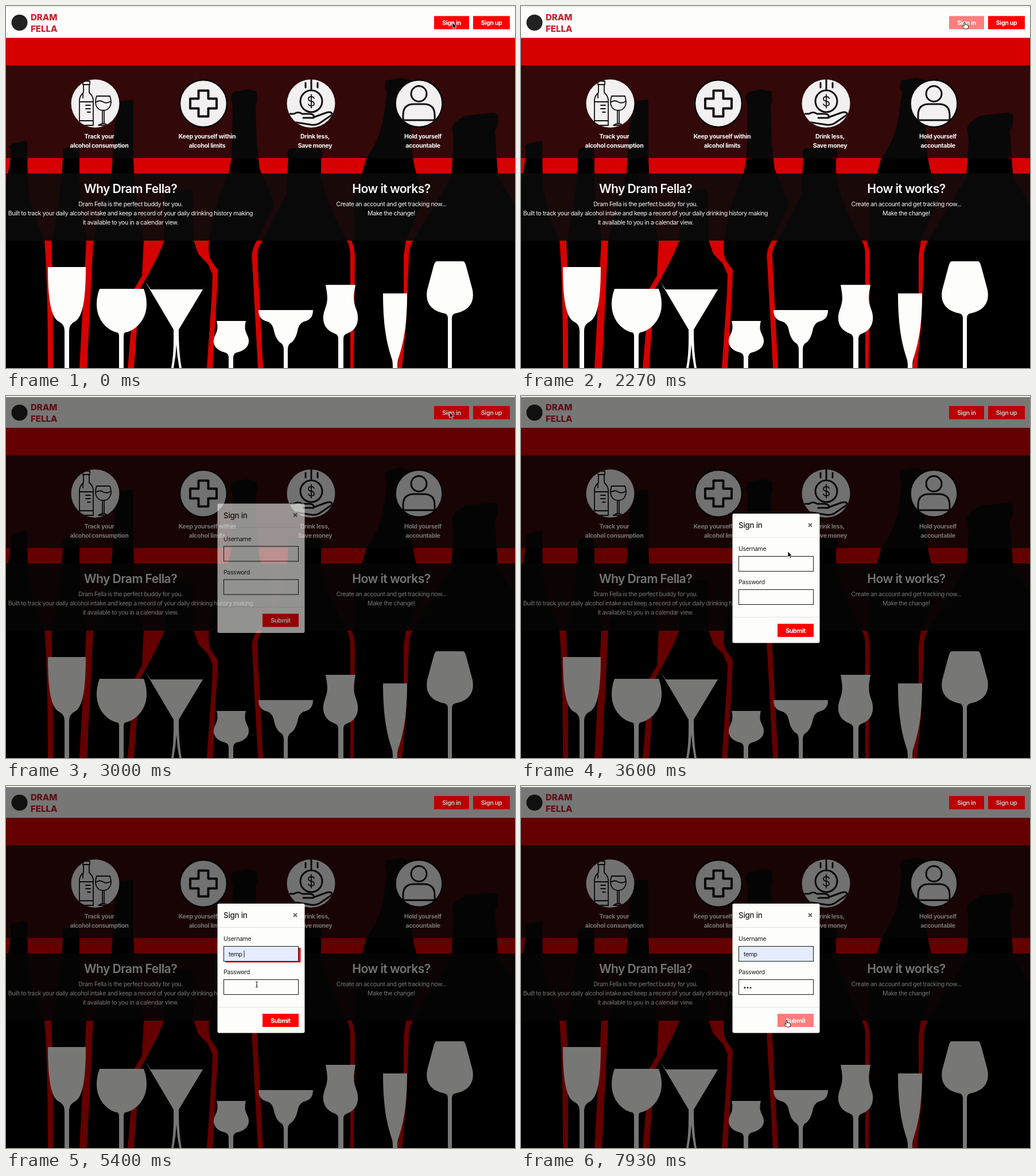
Recreate the animation shown at these times as an HTML page. Size 887 px wide and 631 px high, loop 8000 ms.

```html
<!DOCTYPE html>
<html lang="en">
<head>
<meta charset="utf-8">
<title>Drink tracker sign in</title>
<style>
html, body { margin: 0; width: 100%; height: 100%; overflow: hidden; background: #000; }
svg { display: block; width: 887px; height: 631px; font: 10.6px Inter, "Open Sans", sans-serif; letter-spacing: -.41px; }
.mid { text-anchor: middle; }
.bold { font-weight: 700; letter-spacing: -.34px; }
.head { font-size: 21.2px; font-weight: 600; letter-spacing: -.6px; }
.line { fill: none; stroke: #111; stroke-width: 3; stroke-linecap: round; stroke-linejoin: round; }
.thin { stroke-width: 1.8; }
.thick { stroke-width: 4; }
.field { stroke: #151515; }
</style>
</head>
<body>
<svg viewBox="0 0 887 631">
  <defs>
    <clipPath id="disc"><circle cx="155.5" cy="170" r="42"/></clipPath>
    <clipPath id="coinDisc"><circle cx="531.5" cy="170" r="42"/></clipPath>
  </defs>

  <rect width="887" height="631" fill="#d60000"/>
  <g id="bottles">
    <path d="M8 265V249L6 246 11 240 34 235 38 238 37 250 38 310Q42 350 67 409H0V310Q4 290 8 265Z"/>
    <path d="M99 265 100 250 105 247 127 246 128 262 128 300Q130 350 141 409H80Q92 350 97 300Z"/>
    <path d="M190 200 197 183 198 166 220 163 222 167 222 265 224 310Q226 350 240 409H152Q170 340 184 292Z"/>
    <path d="M277 327 282 320H321L326 327 327 409H276Z"/>
    <path d="M395 173 391 160 396 150 420 145 437 149 438 166 435 173 437 240 442 284 468 345 437 409H354Q364 340 388 292L393 265Z"/>
    <path d="M492 265 490 255 494 248H549L552 258 549 268V295Q556 340 594 409H447L488 330Z"/>
    <path d="M664 150 660 142 662 130 688 125 706 130 708 140 704 148 705 220Q706 260 715 292L728 335 697 409H607V340L628 265Q650 235 657 200Z"/>
    <path d="M780 235 777 213 782 203 800 191 850 186 858 190 857 210 852 217 855 265 858 300 887 345V409H709L776 300Z"/>
  </g>
  <rect y="409" width="887" height="222"/>
  <g fill="#d60000">
    <path d="M67 409H79Q82 470 82 631H73Q73 480 67 409Z"/>
    <path d="M140 409H152L141 631H128Z"/>
    <path d="M240 409H276L265 435 244 475 233 494 223 631H212L224 492 237 470Z"/>
    <path d="M327 409H354Q351 432 358 445L369 460 368 490 360 631H350L359 500 360 468 352 450 335 432Z"/>
    <path d="M437 409H447Q436 424 438 440L448 631H439L429 445Q426 428 437 409Z"/>
    <path d="M594 409H602Q608 422 608 440L606 631H600V435Q600 420 594 409Z"/>
    <path d="M697 409H709Q701 423 702 440L697 560 690 631H682L693 540 693 435Z"/>
  </g>

  <g id="glasses" fill="#fdfdfb">
    <path d="M73 455H139C139 505 135 542 120 550Q110 555 110 566V631H102V566Q102 555 92 550C77 542 73 505 73 455Z"/>
    <path d="M163 493H240Q245 505 245 520C245 550 222 567 208 569Q205 570 205 576V631H197V576Q197 570 194 569C180 567 158 550 158 520Q158 505 163 493Z"/>
    <path d="M243 481 252 494H343L351 481 301 564Q301 605 306 631H302Q298 610 297 590 296 610 292 631H288Q293 605 292 564Z"/>
    <path d="M367 549H418Q414 562 420 573C429 590 417 601 402 604Q396 606 396 613V631H388V613Q388 606 382 604C368 601 356 590 365 573Q371 562 367 549Z"/>
    <path d="M440 530H535Q535 545 523 549 512 551 509 562 505 583 495 588 491 591 491 600V631H484V600Q484 591 480 588 470 583 466 562 463 551 452 549 440 545 440 530Z"/>
    <path d="M557 486H609C606 504 604 512 610 528 617 546 613 564 594 571Q588 573 588 580V631H579V580Q579 573 573 571C553 564 549 546 556 528 562 512 560 504 557 486Z"/>
    <path d="M657 501H699C699 560 692 590 683 617Q682 622 682 631H674Q674 622 673 617C664 590 657 560 657 501Z"/>
    <path d="M750 445H797Q800 446 802 454L813 495C818 523 799 533 782 536Q777 538 777 544V631H770V544Q770 538 765 536C748 533 729 523 734 495L745 454Q747 446 750 445Z"/>
  </g>

  <rect y="103.500" width="887" height="161.500" fill="#0a0a0a" opacity=".8"/>
  <rect y="292" width="887" height="117" fill="#0a0a0a" opacity=".92"/>

  <g fill="#f2f0f0">
    <circle cx="155.5" cy="170" r="42"/>
    <circle cx="344" cy="170" r="41" stroke="#080606" stroke-width="2.500"/>
    <circle cx="531.5" cy="170" r="42"/>
    <circle cx="719.5" cy="170" r="41" stroke="#080606" stroke-width="2.500"/>
  </g>
  <g class="line thin" clip-path="url(#disc)">
    <path d="M134 131H146V137H134ZM135 137V151Q129 156 128 163V208H152V163Q151 156 145 151V137M128 167H152M128 200H152M139 173H147M139 179H147M142 185H147M134 152V160"/>
    <path d="M158 157H181C186 171 181 182 169.500 182 158 182 153 171 158 157ZM156 168Q163 163 169 167T183 166M168 182V205M171 182V205M161 208Q169.500 202 178 208Z"/>
  </g>
  <path class="line thick" d="M335.500 147.500H352.500V161.500H367V178.500H352.500V192.500H335.500V178.500H321V161.500H335.500Z"/>
  <g class="line" clip-path="url(#coinDisc)">
    <circle cx="532" cy="166" r="19"/>
    <path d="M522 134V142M532 128V145M543 134V142M495 188H502Q509 183 516 188H530Q538 189 536 195H518M536 194 558 186Q567 183 569 189L547 204Q541 208 532 207L507 203H495"/>
    <path class="thin" d="M537 161Q536 158 532 158 527 158 527 162 527 165 532 166 537 167 537 170.500 537 174 532 174 528 174 527 171M532 154.500V177.500"/>
  </g>
  <g class="line">
    <circle cx="719.500" cy="153" r="13.500"/>
    <path d="M692 199V190Q692 171 711 171H728Q747 171 747 190V199Z"/>
  </g>

  <g id="copy" class="mid" fill="#f8f8f8"></g>

  <rect y="2" width="887" height="53.500" fill="#fdfdfc"/>
  <circle cx="23.5" cy="29" r="14" fill="#222"/>
  <g fill="#c8202c" font-size="15" font-weight="800" letter-spacing="0">
    <text x="43" y="24.500">DRAM</text><text x="43" y="45">FELLA</text>
  </g>

  <rect id="dim" y="2" width="887" height="629" opacity="0"/>
  <rect width="887" height="2" fill="#fafaf2"/>
  <rect y="1" width="887" height="1" fill="#e6e6d2"/>

  <g class="mid bold">
    <g id="signIn">
      <rect x="746" y="17.500" width="61" height="23" fill="#f00"/><text x="776.500" y="33" fill="#fff">Sign in</text>
    </g>
    <rect x="814" y="17.500" width="64" height="23" fill="#f00"/><text x="846" y="33" fill="#fff">Sign up</text>
    <path id="buttonDim" d="M746 17.500H807V40.500H746ZM814 17.500H878V40.500H814Z" opacity="0"/>
  </g>

  <g id="modal" opacity="0" fill="#1c1c1c">
    <rect x="368.500" y="205" width="152" height="225.500" rx="3" fill="#fdfdfb"/>
    <path d="M369 246.500H520M369 385.500H520" stroke="#dee2e6"/>
    <text x="379" y="230" font-size="13.300" font-weight="500" letter-spacing="-.2">Sign in</text>
    <path d="M501 222 507 228M507 222 501 228" stroke="#666" stroke-width="2"/>
    <text x="379" y="270">Username</text>
    <text x="379" y="328">Password</text>
    <rect id="glow" x="382.500" y="282" width="131" height="25.500" fill="#f00"/>
    <rect id="userField" class="field" x="379.500" y="279.500" width="130" height="26"/>
    <rect class="field" x="379.500" y="337.500" width="130" height="26" fill="#fdfdfb"/>
    <text id="userText" x="388" y="296.500">temp</text>
    <g id="dots"><circle cx="390" cy="351.500" r="1.500"/><circle cx="395" cy="351.500" r="1.500"/><circle cx="400" cy="351.500" r="1.500"/></g>
    <rect id="caret" width="1" height="12"/>
    <g id="submit" class="mid bold">
      <rect x="447" y="397" width="63" height="23" fill="#f00"/><text x="478.500" y="412.500" fill="#fff">Submit</text>
    </g>
  </g>

  <g id="cursor">
    <path id="arrow" d="M0 0V10L2.400 7.900 4 11.500 5.800 10.700 4.200 7.300H7.300Z" fill="#000" stroke="#fff" stroke-width=".8"/>
    <path id="hand" d="M-1 1Q0-.5 1 1V5L2 4.500 3.500 5 5 5.200 6.500 6.500V9L5.500 12H-.5L-4 7.500Q-4 6-2.500 6.500L-1 8Z" fill="#fff" stroke="#111" stroke-width=".9"/>
    <path id="beam" d="M-2-5Q0-5 0-3.500 0-5 2-5M0-4V4M-2 5Q0 5 0 3.500 0 5 2 5M-1 1H1" fill="none" stroke="#222"/>
  </g>
</svg>
<script>
const $ = id => document.getElementById(id);
const LOOP = 8000, STEP = 1000 / 15;

const copy = [
  ["bold", 162.5, 231, "Track your", "alcohol consumption"],
  ["bold", 350.5, 231, "Keep yourself within", "alcohol limits"],
  ["bold", 538.5, 231, "Drink less,", "Save money"],
  ["bold", 726.5, 231, "Hold yourself", "accountable"],
  ["head", 217, 326, "Why Dram Fella?"],
  ["head", 671.5, 326, "How it works?"],
  ["", 217, 348.5, "Dram Fella is the perfect buddy for you.",
    "Built to track your daily alcohol intake and keep a record of your daily drinking history making",
    "it available to you in a calendar view."],
  ["", 671.5, 348.5, "Create an account and get tracking now...", "Make the change!"]
];
for (const [style, x, y, ...lines] of copy) lines.forEach((line, i) => {
  const text = document.createElementNS("http://www.w3.org/2000/svg", "text");
  text.setAttribute("class", style);
  text.setAttribute("x", x);
  text.setAttribute("y", y + i * 16.3);
  text.textContent = line;
  $("copy").append(text);
});

// Pointer positions: time, x, y
const path = [
  [0, 778, 29], [400, 773, 27], [2740, 773, 28], [3000, 773, 28], [3530, 465, 271],
  [3600, 465, 271], [3870, 440, 292], [4870, 440, 292], [5270, 437, 346],
  [7130, 437, 346], [7600, 463, 408], [8000, 463, 408]
];
// Pointer shapes: start time, shape
const shapes = [
  [0, "arrow"], [60, "hand"], [2730, "arrow"], [3730, "beam"], [4330, ""],
  [4860, "beam"], [5990, ""], [7130, "beam"], [7260, "arrow"], [7520, "hand"]
];
const keyTimes = [6330, 6660, 6930];

const clamp = v => Math.min(1, Math.max(0, v));
const show = (id, on) => { $(id).style.display = on ? "" : "none"; };
const fade = (id, value) => $(id).setAttribute("opacity", value);

function pointer(t) {
  const i = path.findIndex(p => p[0] > t);
  const [t0, x0, y0] = path[i - 1], [t1, x1, y1] = path[i];
  const p = (t - t0) / (t1 - t0), e = p * p * (3 - 2 * p);
  return [x0 + (x1 - x0) * e, y0 + (y1 - y0) * e];
}

function draw(t) {
  const shape = shapes.filter(s => s[0] <= t).pop()[1];
  $("cursor").setAttribute("transform", `translate(${pointer(t)})`);
  for (const id of ["arrow", "hand", "beam"]) show(id, id === shape);
  fade("signIn", shape === "hand" && t < 3000 ? .5 : 1);
  fade("submit", shape === "hand" && t > 3000 ? .5 : 1);

  const dim = clamp((t - 2745) / 150);
  fade("dim", dim * .53);
  fade("buttonDim", dim * .27);
  const slide = clamp((t - 2915) / 300);
  fade("modal", clamp((t - 2915) / 150));
  $("modal").setAttribute("transform", `translate(0 ${-34 * (1 - slide) ** 2})`);

  const filled = t >= 4460;
  show("userText", filled);
  $("userField").setAttribute("fill", filled ? "#e4ecfd" : "#fdfdfb");
  const typed = keyTimes.filter(at => t >= at).length;
  [...$("dots").children].forEach((dot, i) => dot.setAttribute("opacity", i < typed ? 1 : 0));

  const onPassword = t >= 5590, focused = t >= 3930 && t < 7790;
  show("glow", focused);
  $("glow").setAttribute("y", onPassword ? 340 : 282);
  const since = t - (typed ? keyTimes[typed - 1] : onPassword ? 5590 : filled ? 4390 : 3930);
  show("caret", focused && since % 1000 < 500 );
  $("caret").setAttribute("x", onPassword ? (typed ? 387 + typed * 5 : 388) : filled ? 414.5 : 388);
  $("caret").setAttribute("y", onPassword ? 345 : 287);
}

const start = performance.now();
function tick(now) {
  const t = Math.max(0, now - start) % LOOP;
  draw(Math.min(Math.floor(t / STEP + .1) * STEP, LOOP - 1));
  requestAnimationFrame(tick);
}
draw(0);
requestAnimationFrame(tick);
</script>
</body>
</html>
```
